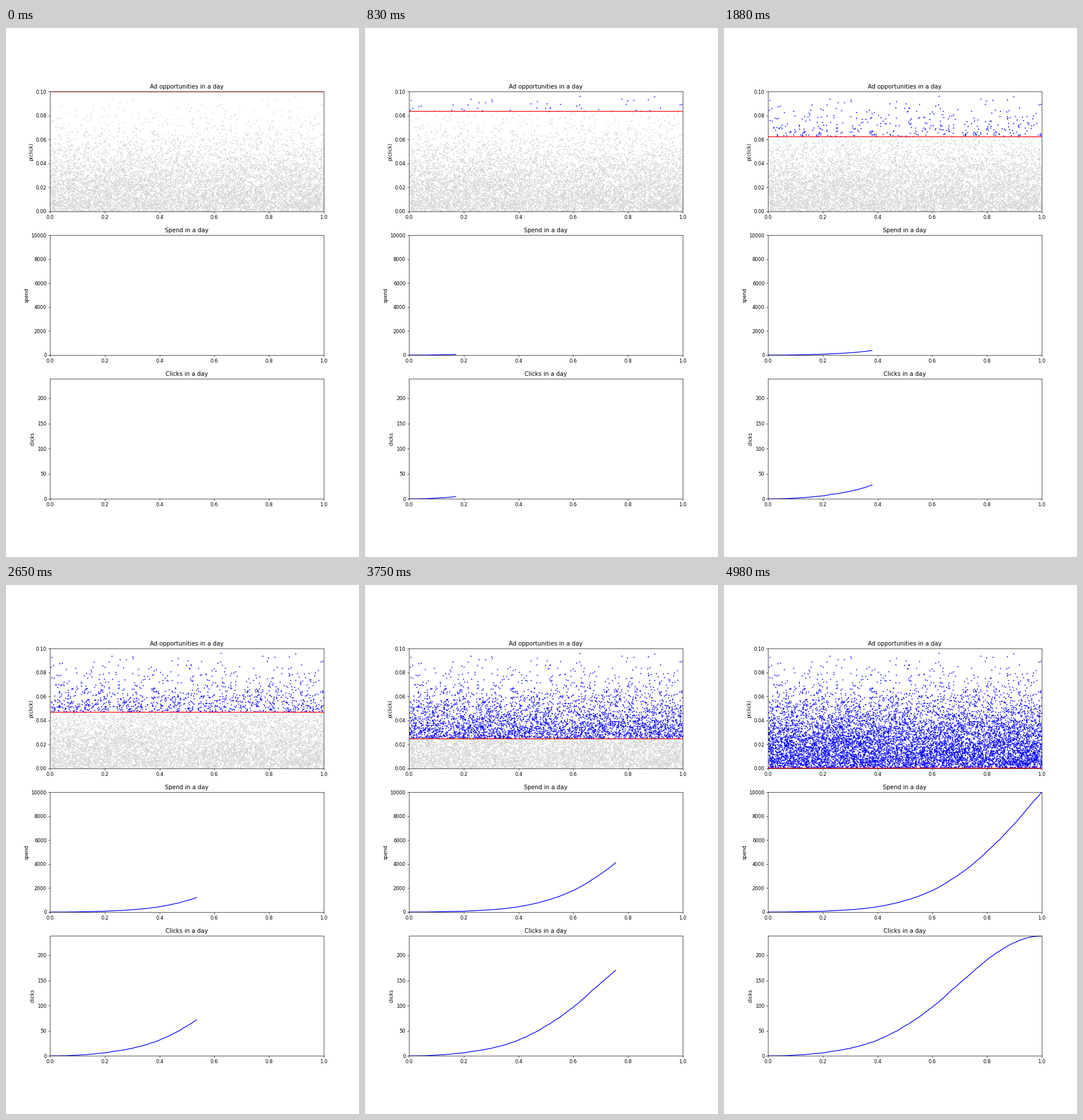
These frames come from a looping animation (611x917 px, 5.01 s). A matplotlib script:

```python
import numpy as np
import matplotlib.pyplot as plt
from matplotlib.animation import FuncAnimation

W, H, DPI = 611, 917, 61.1
EPS = 1e-3  # keeps the pixel size from rounding down
FRAMES, INTERVAL = 200, 25
OPPS = 10000
P_MAX, SIGMA = 0.1, 0.03
CLICKS = 238.5

# Ad opportunities: uniform times, half-normal click probabilities, best first
rng = np.random.default_rng(7)
x = rng.uniform(0, 1, OPPS)
p = np.abs(rng.normal(0, SIGMA, OPPS + 1000))
p = p[p < 0.97 * P_MAX][:OPPS]
p = -np.sort(-p * CLICKS / p.sum())


def count_above(level):
    return np.searchsorted(-p, -level)


# Running totals as the bid threshold falls from P_MAX to zero
day = np.linspace(0, 1, FRAMES + 1)
spend = count_above(P_MAX * (1 - day))
clicks = np.append(0, np.cumsum(p))[spend]

fig, (ax_opp, ax_spend, ax_click) = plt.subplots(
    3, 1, figsize=((W + EPS) / DPI, (H + EPS) / DPI), dpi=DPI)


def setup(ax, title, label, top):
    ax.set_title(title)
    ax.set_ylabel(label)
    ax.set_xlim(0, 1)
    ax.set_ylim(0, top)


setup(ax_opp, "Ad opportunities in a day", "p(click)", P_MAX)
setup(ax_spend, "Spend in a day", "spend", OPPS)
setup(ax_click, "Clicks in a day", "clicks", CLICKS)

dots = dict(linestyle="none", marker="o", markersize=2.3, markeredgewidth=0)
skipped, = ax_opp.plot([], [], color="lightgray", **dots)
bought, = ax_opp.plot([], [], color="blue", **dots)
bar = ax_opp.axhline(P_MAX, color="red")
spend_line, = ax_spend.plot([], [], color="blue")
click_line, = ax_click.plot([], [], color="blue")
artists = skipped, bought, bar, spend_line, click_line


def update(i):
    level = P_MAX * (1 - i / FRAMES)
    n = count_above(level)
    bought.set_data(x[:n], p[:n])
    skipped.set_data(x[n:], p[n:])
    bar.set_ydata([level, level])
    spend_line.set_data(day[:i + 2], spend[:i + 2])
    click_line.set_data(day[:i + 2], clicks[:i + 2])
    return artists


anim = FuncAnimation(fig, update, frames=FRAMES, interval=INTERVAL,
                     init_func=lambda: update(0), repeat=True, repeat_delay=0)
plt.show()
```
